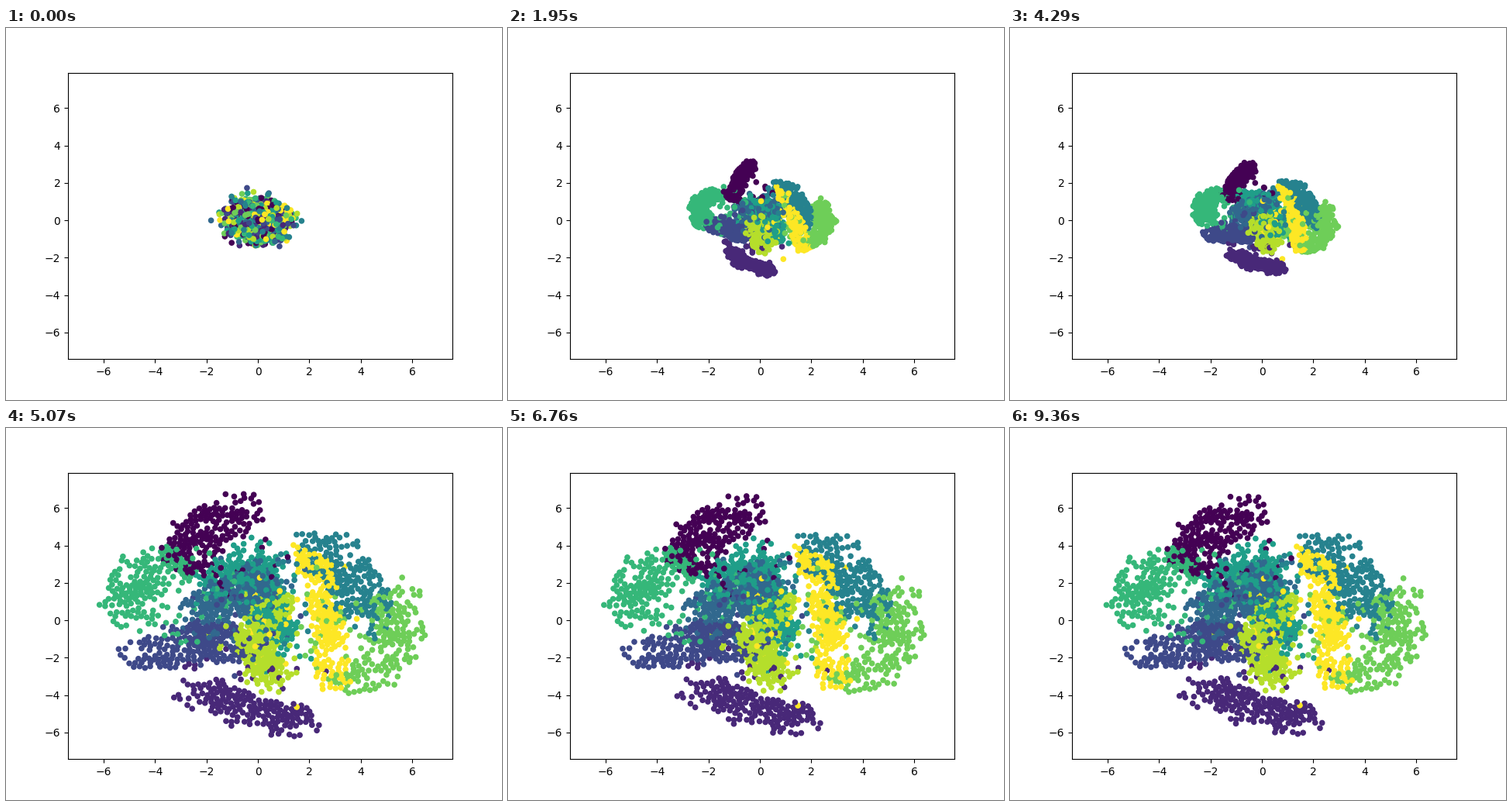
A matplotlib script that plays this animation: 640x480 px, repeating every 9.49 s.

```python
import numpy as np
import matplotlib.pyplot as plt
from matplotlib.animation import FuncAnimation

FRAMES, INTERVAL = 73, 130
CLASSES, PER_CLASS = 10, 180
N = CLASSES * PER_CLASS

rng = np.random.default_rng(4)

# One class per row: points of its spine as x + yj, then the half width of the band.
FINAL = [
    (-0.5+5.9j, -1.3+5.3j, -2.5+4.7j, -2.4+2.9j, 1.05),
    (-2.8-3.9j, -1.6-3.7j, -0.6-4.9j, 1.8-5.4j, 0.9),
    (-4.5-2.0j, -3.4-1.5j, -2.1-0.9j, -0.8-1.3j, 1.0),
    (-2.2+0.0j, -1.6+0.8j, -0.3+1.8j, 0.6+2.3j, 1.1),
    (1.7+3.7j, 3.0+3.5j, 3.8+1.9j, 4.2+0.0j, 1.1),
    (-1.8+1.8j, -0.2+3.6j, 0.1+1.2j, 1.5-1.8j, 0.85),
    (-3.1+3.0j, -4.4+2.4j, -5.0+1.2j, -4.5+0.3j, 1.2),
    (5.1+1.5j, 5.4-0.4j, 4.8-2.2j, 3.8-3.5j, 1.1),
    (0.8+1.2j, 0.2+0.2j, -0.2-1.9j, 0.8-3.1j, 0.75),
    (1.7+3.6j, 2.4+2.2j, 2.7-0.8j, 2.8-3.5j, 0.65),
]
EARLY = [
    (0.4+3.0j, -0.1+2.6j, -0.4+1.3j, 0.3),
    (-1.0-0.6j, -1.5-1.7j, -0.4-2.9j, 0.3),
    (-1.7+1.3j, -1.1+0.5j, -0.9-0.4j, 0.35),
    (0.0+0.9j, 0.8-0.2j, 1.5-0.8j, 0.55),
    (0.3+1.6j, 0.6+1.0j, 0.9+0.0j, 0.5),
    (0.4-0.3j, 0.9-0.9j, 0.6-2.0j, 0.45),
    (-2.0+1.4j, -2.5+0.6j, -2.2-0.6j, 0.35),
    (1.9+1.5j, 2.4+1.0j, 2.5-0.4j, 0.4),
    (-0.6+0.2j, -0.2-0.5j, -0.4-1.5j, 0.42),
    (0.8+1.5j, 1.2+0.6j, 1.9-1.5j, 0.35),
]
MIDDLE = [
    (-0.6+3.0j, -1.0+2.2j, -1.3+1.1j, 0.22),
    (-1.2-1.8j, -0.6-2.4j, 0.7-2.7j, 0.28),
    (-1.9-0.8j, -1.4-0.7j, -0.6-0.9j, 0.42),
    (-0.8+0.2j, -0.3+0.7j, 0.2+1.1j, 0.55),
    (0.7+1.9j, 1.5+1.6j, 2.1-0.1j, 0.35),
    (-0.6+1.3j, 0.2+0.5j, 0.8-0.7j, 0.5),
    (-1.7+1.5j, -2.4+0.9j, -2.2-0.1j, 0.38),
    (2.3+0.7j, 2.6-0.3j, 1.9-1.6j, 0.42),
    (-0.2+0.2j, 0.0-0.7j, 0.4-1.3j, 0.5),
    (0.8+1.7j, 1.3+0.6j, 1.6-1.6j, 0.28),
]


def disc(n):
    """Random points spread evenly over the unit disc."""
    return np.sqrt(rng.random(n)) * np.exp(2j * np.pi * rng.random(n))


labels = np.arange(N) % CLASSES
along = rng.random(N)
jitter = disc(N)
stray = rng.random(N) < 0.16
drift = 2.2 * disc(N)


def spread(pos, gap, rounds=12):
    """Push crowded points apart until most are about one gap away."""
    for _ in range(rounds):
        diff = pos[:, None] - pos[None, :]
        dist = np.abs(diff)
        push = np.where(dist < gap, (gap - dist) / (dist + 1e-6), 0)
        np.fill_diagonal(push, 0)
        pos = pos + 0.2 * (push * diff).sum(axis=1)
    return pos


def layout(bands, scale):
    pos = np.empty(N, complex)
    for k, (*spine, width) in enumerate(bands):
        own = labels == k
        spine = np.array(spine)
        length = np.concatenate([[0], np.cumsum(np.abs(np.diff(spine)))])
        pos[own] = np.interp(along[own] * length[-1], length, spine)
        pos[own] += width * jitter[own]
    pos[stray] = 0.65 * pos[stray] + scale * drift[stray]
    return spread(pos, 0.22 * scale)


cloud = rng.normal(0, 0.5, N) + 1j * rng.normal(0, 0.5, N)
early, middle, final = layout(EARLY, 0.45), layout(MIDDLE, 0.45), layout(FINAL, 1)

STAGES = [
    (0, cloud),
    (9, early),
    (21, middle),
    (34, 0.65 * middle + 0.35 * 0.45 * final),
    (41, 1.07 * final),
    (47, 1.012 * final),
    (54, 1.002 * final),
    (72, final),
]


def position(frame):
    for (t0, a), (t1, b) in zip(STAGES, STAGES[1:]):
        if frame <= t1:
            t = (frame - t0) / (t1 - t0)
            return a + (b - a) * (1 - (1 - t) ** 2)
    return final


def offsets(frame):
    pos = position(frame)
    return np.column_stack([pos.real, pos.imag])


fig, ax = plt.subplots(figsize=(6.4, 4.8), dpi=100)
dots = ax.scatter(*offsets(0).T, c=labels, s=20, cmap="viridis")
ax.set_xlim(-7.385, 7.56)
ax.set_ylim(-7.42, 7.9)


def update(frame):
    dots.set_offsets(offsets(frame))
    return dots,


anim = FuncAnimation(fig, update, frames=FRAMES, interval=INTERVAL,
                     repeat=True, repeat_delay=0)
plt.show()
```
